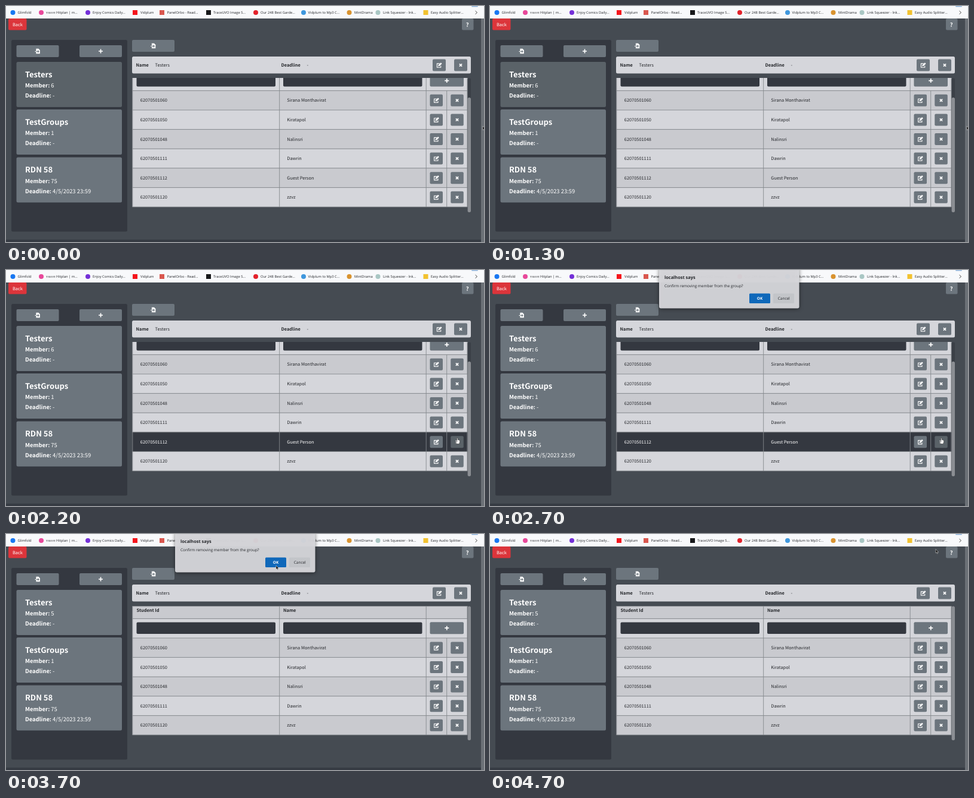
Recreate the animation shown at these times as an HTML page. Size 800 px wide and 397 px high, loop 4800 ms.

```html
<!DOCTYPE html>
<html lang="en">
<head>
<meta charset="utf-8">
<style>
html, body { margin: 0; width: 100%; height: 100%; overflow: hidden; background: #454b52; }
svg { display: block; width: 800px; height: 397px; text-rendering: geometricPrecision; }
text { font: 7.4px "Noto Sans CJK JP", "Noto Sans", sans-serif; fill: #25272b; white-space: pre; }
.ui { font-family: "Open Sans", "Noto Sans", sans-serif; }
.mark { font-size: 5.8px; }
.ask { font-size: 6.45px; }
.b { font-weight: 700; }
.w { fill: #fff; }
.title { font-size: 13px; }
.info { font-size: 9.4px; }
.line { fill: none; stroke: #fff; }
.grid { fill: none; stroke: #85888d; stroke-width: .9; }
.dialog { filter: drop-shadow(0 1px 3px #0008); }
</style>
</head>
<body>
<svg id="stage" viewBox="0 0 800 397"></svg>
<script>
const LOOP = 4800, STEP = 100;
const DIALOG_OPEN = 2700, REMOVED = 3700, DIALOG_CLOSED = 3800;
const GREY = '#6c757d', ACTIVE = '#5a6268', DARK = '#343840';
const ROW = 32.6, TABLE_TOP = 121.5, ROWS_TOP = 175;

// label, label x, icon x, icon colour, round icon
const bookmarks = [
  ['Glimfold', 19.5, 11.5, '#1877f2', 1],
  ['รายการ Hitplan | m...', 67, 59, '#e8489a', 1],
  ['Enjoy Comics Daily...', 145, 137, '#7430d8', 1],
  ['Vidplum', 225, 216, '#f5141c', 0],
  ['PanelOrbo - Read...', 269.5, 261, '#d9574f', 0],
  ['TraceUVO Image S...', 347, 339, '#17181a', 0],
  ['Our 248 Best Garde...', 426, 418, '#e3222b', 1],
  ['Vidplum to Mp3 C...', 505.5, 498, '#3f97dd', 1],
  ['MintDrama', 583, 574.5, '#d9932f', 1],
  ['Link Squeezer - lnk...', 631, 622.5, '#a9c7c4', 1],
  ['Easy Audio Splitter...', 711, 702.5, '#f2c230', 0],
];
const members = [
  ['62070501060', 'Sirana Monthavirat'],
  ['62070501050', 'Kiratapol'],
  ['62070501048', 'Nalinsri'],
  ['62070501111', 'Dawrin'],
  ['62070501112', 'Guest Person'],
  ['62070501120', 'zzvz'],
];
const LEAVING = 4;

// pointer stops: time, x, y
const path = [
  [0, 798, 202], [1300, 798, 202], [1900, 753.5, 273.5], [2200, 755.5, 282.5],
  [2800, 755.5, 282.5], [3500, 452, 53], [3800, 452, 53], [4600, 746, 25.5], [LOOP, 746, 25.5],
];

const rect = (x, y, w, h, fill, r = 0) =>
  `<rect x="${x}" y="${y}" width="${w}" height="${h}" rx="${r}" fill="${fill}"/>`;
const text = (x, y, s, cls = '') => `<text x="${x}" y="${y}" class="${cls}">${s}</text>`;
const shape = (x, y, d, attrs) => `<path transform="translate(${x} ${y})" d="${d}" ${attrs}/>`;

const icons = {
  plus: (x, y) => shape(x, y, 'M-3.5 0H3.5M0-3.5V3.5', 'class="line" stroke-width="1.7"'),
  cross: (x, y) => shape(x, y, 'M-2.1-2.1L2.1 2.1M2.1-2.1L-2.1 2.1', 'class="line" stroke-width="1.7"'),
  edit: (x, y) => shape(x, y, 'M.8-2.6H-3.6V3.7H2.7V1', 'class="line" stroke-width="1.1"') +
    shape(x, y, 'M-1.7 1.9L-1.3-.2L2.8-4.3L4.6-2.5L.5 1.5Z', 'fill="#fff"'),
  load: (x, y) => shape(x, y, 'M-2.6-4.2H1.4L3.8-1.8V4.2H-2.6Z', 'fill="#fff"') +
    shape(x, y, 'M-2.6.5H1.5M0-1.3L1.8.5L0 2.3', `fill="none" stroke="${GREY}" stroke-width="1.1"`) +
    shape(x, y, 'M-4.5.5H-2.6', 'class="line" stroke-width="1.1"'),
};
const button = (x, y, w, icon, fill = GREY) =>
  rect(x, y, w, 20, fill, 2) + icons[icon](x + w / 2, y + 10);

function pointerAt(t) {
  const i = path.findIndex(p => p[0] > t);
  const [t0, x0, y0] = path[i - 1], [t1, x1, y1] = path[i];
  const u = (t - t0) / (t1 - t0), k = u * u * (3 - 2 * u);
  return { x: x0 + (x1 - x0) * k, y: y0 + (y1 - y0) * k };
}

function browserBar() {
  const marks = bookmarks.map(([label, x, ix, color, round]) =>
    rect(ix - 4, 7, 8, 8, color, round ? 4 : 0) + text(x, 13.2, label, 'ui mark'));
  return rect(0, 0, 800, 21, '#f8f9fb') + marks.join('') +
    rect(779, 0, 11, 1.6, '#8fb4dc', 1) +
    shape(787, 11, 'M-1.5-2.8L1.5 0L-1.5 2.8', 'fill="none" stroke="#333" stroke-width=".9"');
}

function card(y, title, count, deadline, fill = GREY) {
  const info = (dy, label, value) =>
    text(32, y + dy, `<tspan class="b">${label}:</tspan> ${value}`, 'info w');
  return rect(17.5, y, 176.5, 76, fill, 2.5) + text(32, y + 25.6, title, 'title b w') +
    info(43.4, 'Member', count) + info(60.4, 'Deadline', deadline);
}

function page(t) {
  return rect(0, 21, 800, 376, '#454b52') + rect(0, 393, 795, 4, '#363b43') +
    rect(795, 21, 5, 376, '#6b7076') +
    rect(4, 21, 30.5, 19.5, '#dc353b', 2) + text(11, 33.7, 'Back', 'w') +
    rect(763, 21, 19.5, 19.5, GREY, 2) + text(769.8, 34.6, '?', 'b w info') +
    rect(9, 57, 194, 322.5, DARK, 2.5) +
    button(17.5, 66, 71, 'load') + button(123, 66, 71, 'plus') +
    card(94, 'Testers', t < REMOVED ? 6 : 5, '-', t < 1500 ? ACTIVE : GREY) +
    card(174, 'TestGroups', 1, '-') + card(254.5, 'RDN 58', 75, '4/5/2023 23:59') +
    button(211, 57, 71, 'load') +
    rect(211, 85, 567, 28.5, '#d5d6db', 2.5) +
    text(217.5, 102.2, 'Name', 'b') + text(249.5, 102.2, 'Testers') +
    text(460.5, 102.2, 'Deadline', 'b') + text(503.5, 102.2, '-') +
    button(714, 89.5, 22, 'edit') + button(750, 89.5, 22, 'cross');
}

function table(rows, scroll, hover, onCross) {
  const bottom = ROWS_TOP + ROW * rows.length;
  let out = rect(211.5, TABLE_TOP, 561, 21, '#c9cacf') +
    rect(211.5, 142.4, 561, ROW, '#d5d6db') +
    text(218.5, 131.2, 'Student Id', 'b') + text(464, 131.2, 'Name', 'b') +
    rect(218.5, 148.5, 232.5, 19.5, DARK, 2) + rect(464, 148.5, 232.5, 19.5, DARK, 2) +
    button(709.5, 148.2, 56.5, 'plus');
  let lines = `M211.5 ${TABLE_TOP}H772M211.5 142.4H772`;
  rows.forEach(([id, name], i) => {
    const y = ROWS_TOP + ROW * i, lit = i === hover, cls = lit ? 'w' : '';
    out += rect(211.5, y, 561, ROW, lit ? DARK : i % 2 ? '#d5d6db' : '#c9cacf') +
      text(224.8, y + 19, id, cls) + text(470.3, y + 19, name, cls) +
      button(709.5, y + 6.4, 21.5, 'edit') +
      button(744.3, y + 6.4, 21.5, 'cross', lit && onCross ? ACTIVE : GREY);
    lines += `M211.5 ${y}H772`;
  });
  lines += `M211.5 ${bottom}H772M737.7 ${ROWS_TOP}V${bottom}`;
  for (const x of [211.8, 457.7, 703.2, 772]) lines += `M${x} ${TABLE_TOP}V${bottom}`;
  return `<clipPath id="view"><rect x="211" y="121" width="562" height="226"/></clipPath>
    <g clip-path="url(#view)"><g transform="translate(0 ${-scroll})">${out}<path class="grid" d="${lines}"/></g></g>` +
    rect(772.6, 121.5, 5.4, 225.5, '#3a3f46', 2) +
    rect(772.6, 121.5 + scroll, 5.4, 225.5 - scroll, '#8b8e93', 2.5);
}

function dialog() {
  return `<g class="dialog">${rect(283, -4, 234.5, 68.5, '#d8d9ddf2', 3)}</g>` +
    text(292, 14.5, 'localhost says', 'ui b') +
    text(292, 29.4, 'Confirm removing member from the group?', 'ui ask') +
    rect(434, 39.5, 35, 16.5, '#0f68ba', 1.5) + text(446.8, 50, 'OK', 'ui b w ask') +
    rect(474, 39.5, 35, 16.5, '#c3c5c9', 1.5) + text(481.8, 50, 'Cancel', 'ui ask');
}

const pointer = ({ x, y }, hand) => hand
  ? shape(x, y, 'M-.8 0H.6V3L4 4V7L3 10H-1L-3 6.5L-2.2 5.7L-.8 7Z', 'fill="#fff" stroke="#222" stroke-width=".5"')
  : shape(x, y, 'M0 0V6.6L1.5 5.3L2.5 7.6L3.6 7.1L2.6 4.9H4.6Z', 'fill="#111" stroke="#eee" stroke-width=".5"');

function scene(t) {
  const removed = t >= REMOVED, scroll = removed ? 0 : ROW;
  const asking = t >= DIALOG_OPEN && t < DIALOG_CLOSED;
  const spot = pointerAt(t);
  // The page keeps its hover state while the dialog blocks it.
  const at = asking && !removed ? pointerAt(DIALOG_OPEN) : spot;
  const row = Math.floor((at.y + scroll - ROWS_TOP) / ROW);
  const hover = at.x < 772 ? row : -1;
  const inside = p => p.x > 744 && p.x < 766 && p.y > 278.9 && p.y < 299;
  const rows = removed ? members.filter((_, i) => i !== LEAVING) : members;
  return browserBar() + page(t) + table(rows, scroll, hover, inside(at)) +
    (asking ? dialog() : '') + pointer(spot, !removed && inside(spot));
}

const stage = document.getElementById('stage');
let shown = -1;
function tick() {
  const t = Math.floor(performance.now() % LOOP / STEP) * STEP;
  if (t !== shown) stage.innerHTML = scene(shown = t);
  requestAnimationFrame(tick);
}
tick();
</script>
</body>
</html>
```
